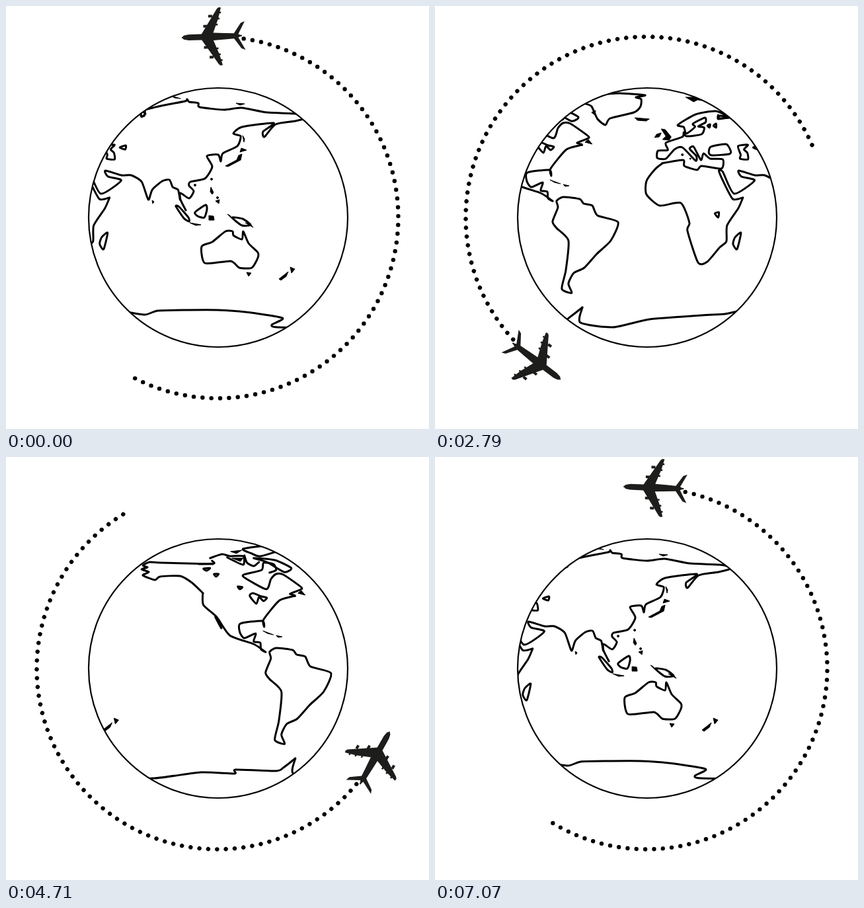
Recreate the animation shown at these times as an HTML page. Size 640 px wide and 640 px high, loop 7140 ms.

```html
<!DOCTYPE html>
<html lang="en">
<head>
<meta charset="utf-8">
<title>Plane circling the globe</title>
<style>
html, body { margin: 0; width: 100%; height: 100%; overflow: hidden; background: #fff; }
svg { display: block; width: 100vw; height: 100vh; }
.line { fill: none; stroke: #000; stroke-width: 3; stroke-linejoin: round; stroke-linecap: round; }
.solid { fill: #000; stroke: #000; stroke-width: 1; stroke-linejoin: round; }
.plane { fill: #1d1d1b; stroke: #1d1d1b; stroke-width: 0; }
</style>
</head>
<body>
<svg viewBox="0 0 640 640">
<defs><clipPath id="disc"><circle cx="321" cy="320" r="196"/></clipPath></defs>
<g clip-path="url(#disc)">
<g id="scroll">
<g id="map">

<!-- East Asia and Oceania -->
<g class="line">
<path d="M204 162 205 168 211 163 208 158 235 151 271 144 274 141 277 145 291 147 293 153 330 157 356 154 395 161 440 163 459 168 438 174 408 179 391 198 389 190 405 177 357 183 344 193 355 197 350 212 328 223 325 235 321 225 304 227 312 243 301 261 279 266 277 272 284 280 277 291 264 283 264 293 272 309"/>
<path d="M257 303 262 304 276 320 277 326 269 321z"/>
<path d="M286 312 302 301 304 308 300 320 290 318z"/>
<path d="M342 320 358 322 370 331 357 332z"/>
<path d="M296 364 312 357 332 341 343 341 344 347 357 353 359 341 367 359 381 373 381 381 372 396 353 396 340 386 301 389z"/>
</g>
<g class="solid">
<path d="M250 136 264 140 255 139zM348 147 361 148 354 150z"/>
<path d="M221 294 224 296 222 299z"/>
<path d="M278 328 295 331 287 332z"/>
<path d="M307 317 314 318 315 324 307 324z"/>
<path d="M310 274 314 282 312 285 309 281zM317 295 323 293 322 299z"/>
<path d="M335 315 339 317 342 322zM362 328 369 329 374 335z"/>
<path d="M332 242 349 233 352 226 357 224 355 233 336 243z"/>
<path d="M356 215 364 218 354 221zM358 196 361 201 360 206z"/>
<path d="M364 403 371 404 367 409zM430 395 437 398 432 404zM413 413 427 402 424 409 416 415z"/>
<circle cx="311" cy="262" r="1.500"/><circle cx="320" cy="290" r="1.500"/><circle cx="286" cy="271" r="1.500"/><circle cx="193" cy="146" r="1"/>
</g>

<!-- Arabia, India, Antarctica -->
<g transform="translate(-110.7)" class="line">
<path d="M230 165 233 170 285 165 305 163 307 155 314 154 315 166 320 166 321 159"/>
<path d="M267 290 252 292 237 264 231 249 237 251 254 284 285 264 265 258 261 249 285 256 300 256 316 266 326 293 332 278 347 265 358 263 363 274 371 278 374 293"/>
<path d="M272 158 278 153 293 149 279 155"/>
<path d="M260 212 275 210 269 217 274 222 275 232 263 231 264 225z"/>
<path d="M283 214 292 211 291 217zM225 314 231 312 230 320z"/>
<path d="M24.5 456 21.500 479 71 486 126 474 205 468 240 466 273 460 320 467 340 461 386 460 431 460 473 463 529 472 513 482 521 486 602 486 672 477 723 479 725 473 786 475 797 470 815 456"/>
</g>

<!-- Europe -->
<g transform="translate(-229.9)">
<g class="line">
<path d="M425 163 385 166 350 171 352 166 364 167 345 159 315 164 288 180 297 183 301 193 314 183 311 178 329 169 330 176 319 182 328 184 324 194 301 197 297 191 295 198 270 207 273 218 258 219 257 230 270 231 283 217 295 214 315 234 316 227 306 216 312 213 323 233 327 223 337 231 356 232 354 246 324 242 317 248 298 242 296 233 264 238"/>
<path d="M335 222 338 213 361 209 368 219 366 224 340 226z"/>
<path d="M333 181 337 179 336 184zM342 181 346 178 346 184z"/>
</g>
<g class="solid">
<path d="M300 138 330 138 324 143 318 142 312 145z"/>
<path d="M223 169 245 171 240 174 227 173z"/>
<path d="M263 186 269 187 278 198 275 203 265 202 270 197zM253 199 256 194 263 192 260 198z"/>
<path d="M390 158 396 152 412 147z"/>
<circle cx="295" cy="225" r="1.500"/><circle cx="307" cy="231" r="1"/>
</g>
</g>

<!-- Africa and Greenland -->
<g transform="translate(-309.3)" class="line">
<path d="M344 238 333 247 320 265 320 285 340 302 372 298 385 328 382 340 398 388 412 387 431 365 441 356 442 332 459 306 466 290"/>
<path d="M463 343 454 350 451 360 457 368z"/>
<path d="M228 148 237 152 246 171 258 180 265 170 301 161 311 152 312 141 304 138 318 135 280 132 262 133"/>
</g>

<!-- Americas -->
<g transform="translate(-437.3)">
<g class="line">
<path d="M211 206 212 224 232 242 252 270 288 283 306 295 299 291 298 281 288 279 291 267 274 274 267 265 268 252 301 248 304 257 303 246 327 217 350 210 343 207 358 201 360 197 333 178 322 177 314 185 307 200 275 183 273 178 300 171 303 160 318 162 322 171 312 175"/>
<path d="M230 242 239 259 236 248"/>
<path d="M312 295 322 289 347 292 353 299 366 302 374 317 405 327 394 355 373 375 354 396 338 404 330 420 335 434 320 428 326 400 330 355 312 336 306 326 314 305z"/>
<path d="M282 210 287 206 300 211 308 213 303 218 296 212 292 222z"/>
<path d="M212 169 222 168 217 172zM228 177 235 177 231 181zM264 196 271 197 267 200z"/>
<path d="M205 162 228 161 225 157"/>
<path d="M272 139 315 133 342 132 340 137 299 150 285 146z"/>
<path d="M342 135 382 133M325 141 342 139 356 143"/>
<path d="M288 153 320 156 345 168 334 174 308 159z"/>
<path d="M222 153 240 147 252 150 272 150 272 163 248 152"/>
<path d="M274 149 278 160 288 165 296 159"/>
</g>
<g class="solid">
<path d="M355 206 360 202 366 209zM344 212 350 208 352 211zM365 161 371 158 370 165z"/>
<path d="M302 263 318 269 309 267zM322 270 331 272 325 273z"/>
<path d="M253 143 270 141 262 146zM255 153 272 153 268 158z"/>
</g>
</g>

<!-- Alaska -->
<g transform="translate(171.7)" class="line">
<path d="M408 162 330 160 312 159 302 164 309 167 300 170 311 174 302 179 320 186 328 181 358 180 376 190 393 206"/>
</g>
</g>
<use id="again" href="#map"/>
</g>
</g>
<circle cx="321" cy="320" r="196" fill="none" stroke="#000" stroke-width="2.2"/>
<g id="orbit">
<g id="trail"></g>
<g class="plane" transform="translate(316 46.2) rotate(-2)">
<g id="half">
<path d="M-50 0-47-3-40-4.400-20-4.500-4-29 4.500-42 7-44 10.500-43.500 6-27-2.300-5.800 15-4.800 29-4 39.700-19.300 45.800-21.600 35.500-2.500 41 0 41 1-50 1z"/>
<path stroke-width="4" d="M-9-31h6M-17-16h6"/>
<path stroke-width="2.5" d="M5-36h5.500M4-27h4M1-18h4"/>
</g>
<use href="#half" transform="scale(1 -1)"/>
</g>
</g>
</svg>
<script>
const LOOP = 7140, STEPS = 100, WRAP = 790.6;
// step number, degrees flown
const flight = [[0, 0], [14, 50.4], [29, 104.7], [39, 140.8], [55, 199.1], [78, 281.7], [99, 355.95], [100, 360]];
const get = id => document.getElementById(id);
const scroll = get('scroll'), orbit = get('orbit');

// Bends a run of corners into a slightly rounded curve through the same points.
function soften(run) {
  const closed = run.endsWith('z');
  const n = run.match(/[\d.]+/g).map(Number);
  const p = [];
  for (let i = 0; i < n.length; i += 2) p.push([n[i], n[i + 1]]);
  const at = i => closed ? p[(i + p.length) % p.length] : p[Math.max(0, Math.min(p.length - 1, i))];
  const mix = (a, b, c) => a.map((v, k) => v + (c[k] - b[k]) / 9);
  let d = 'M' + p[0];
  for (let i = 0; i < p.length - (closed ? 0 : 1); i++) {
    const a = at(i), b = at(i + 1);
    d += 'C' + [mix(a, at(i - 1), b), mix(b, at(i + 2), a), b].join(' ');
  }
  return d;
}
for (const path of document.querySelectorAll('.line path')) {
  path.setAttribute('d', path.getAttribute('d').match(/M[^M]+/g).map(soften).join(''));
}

get('again').setAttribute('x', -WRAP);

for (let i = 0; i < 72; i++) {
  const a = (8.35 + 2.8 * i) * Math.PI / 180;
  const dot = document.createElementNS('http://www.w3.org/2000/svg', 'circle');
  dot.setAttribute('cx', 320 + 273.5 * Math.sin(a));
  dot.setAttribute('cy', 320 - 273.5 * Math.cos(a));
  dot.setAttribute('r', 3.2);
  get('trail').append(dot);
}

function angleAt(step) {
  const i = flight.findIndex(p => p[0] > step);
  const [s0, a0] = flight[i - 1], [s1, a1] = flight[i];
  return a0 + (a1 - a0) * (step - s0) / (s1 - s0);
}

function draw(now) {
  const t = now % LOOP;
  const step = Math.min(STEPS - 1, Math.floor((t + 5) * STEPS / LOOP));
  const angle = angleAt(step);
  scroll.setAttribute('transform', `translate(${angle / 360 * WRAP})`);
  orbit.setAttribute('transform', `rotate(${-angle} 320 320)`);
}

const start = performance.now();
function tick() {
  draw(performance.now() - start);
  requestAnimationFrame(tick);
}
tick();
</script>
</body>
</html>
```
